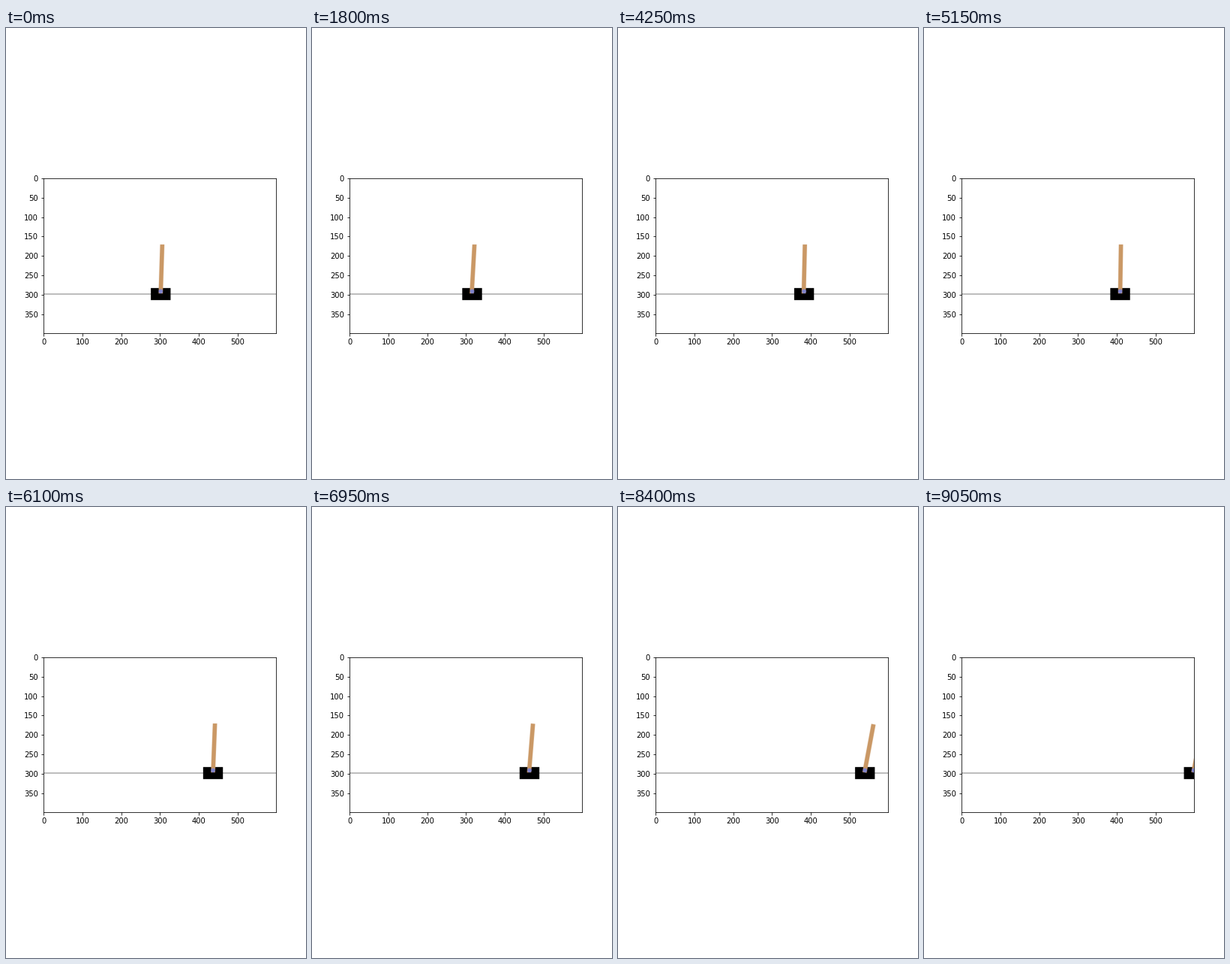
A matplotlib script for the animation above (9.1 s loop, 400 by 600 pixels).

```python
import numpy as np
import matplotlib.pyplot as plt
from matplotlib.animation import FuncAnimation

DPI = 72
STAGE_W, STAGE_H = 400, 600
FRAMES, INTERVAL = 182, 50

# Simulated screen, y pointing up
WORLD_W, WORLD_H = 600, 400
TRACK_Y = 100
CART_W, CART_H = 50, 30
AXLE_Y = TRACK_Y + CART_H / 4
POLE_W, POLE_LEN = 10, 125

BLACK = (0, 0, 0)
TAN = (202, 152, 101)
LILAC = (129, 132, 203)

X, Y = np.meshgrid(np.arange(WORLD_W), np.arange(WORLD_H))


def cart_x(i):
    """A small settling drift, then stretches of constant acceleration."""
    def push(start, accel):
        return accel / 2 * max(0, i - start) ** 2

    drift = 1.2 * np.exp(-i / 2.5)
    return (301.2 + drift + push(13, 0.0565) + push(36, -0.0538)
            + push(141.7, 0.0856))


def pole_angle(i):
    """Leans while setting off, recovers, and finally tips over."""
    start = 0.06 * np.exp(-((i - 22) / 18) ** 2)
    fall = 0.19 / (1 + np.exp((147 - i) / 11))
    return 0.018 + start + fall


def paint(img, outside, color):
    """Blend color in, fading over one pixel beyond the shape's edge."""
    alpha = np.clip(1 - outside, 0, 1)[..., None]
    img += alpha * (np.array(color) - img)


def box(left, right, bottom, top):
    return np.array([(left, bottom), (left, top), (right, top), (right, bottom)])


def polygon(img, points, color):
    """Fill a convex clockwise polygon whose corners sit on whole pixels."""
    points = points.astype(int)
    edges = []
    for (x0, y0), (x1, y1) in zip(points, np.roll(points, -1, axis=0)):
        ex, ey = x1 - x0, y1 - y0
        edges.append((ex * (Y - y0) - ey * (X - x0)) / np.hypot(ex, ey))
    paint(img, np.max(edges, axis=0), color)


def render(i):
    cx, angle = cart_x(i), pole_angle(i)
    img = np.full((WORLD_H, WORLD_W, 3), 255.0)

    cart = box(-CART_W / 2, CART_W / 2, -CART_H / 2, CART_H / 2)
    polygon(img, cart + (cx, TRACK_Y), BLACK)

    half = POLE_W / 2
    c, s = np.cos(angle), np.sin(angle)
    pole = box(-half, half, -half, POLE_LEN - half) @ [[c, -s], [s, c]]
    polygon(img, pole + (cx, AXLE_Y), TAN)

    paint(img, np.hypot(X - int(cx), Y - int(AXLE_Y)) - half, LILAC)
    img[TRACK_Y] = BLACK
    return img[::-1].astype(np.uint8)


plt.rcParams["font.family"] = "DejaVu Sans"
fig = plt.figure(figsize=(STAGE_W / DPI, STAGE_H / DPI), dpi=DPI)
ax = fig.add_subplot()
screen = ax.imshow(render(0), interpolation="hanning")


def update(i):
    screen.set_data(render(i))
    return [screen]


anim = FuncAnimation(fig, update, frames=FRAMES, interval=INTERVAL,
                     repeat=True, repeat_delay=0, cache_frame_data=False)
plt.show()
```
